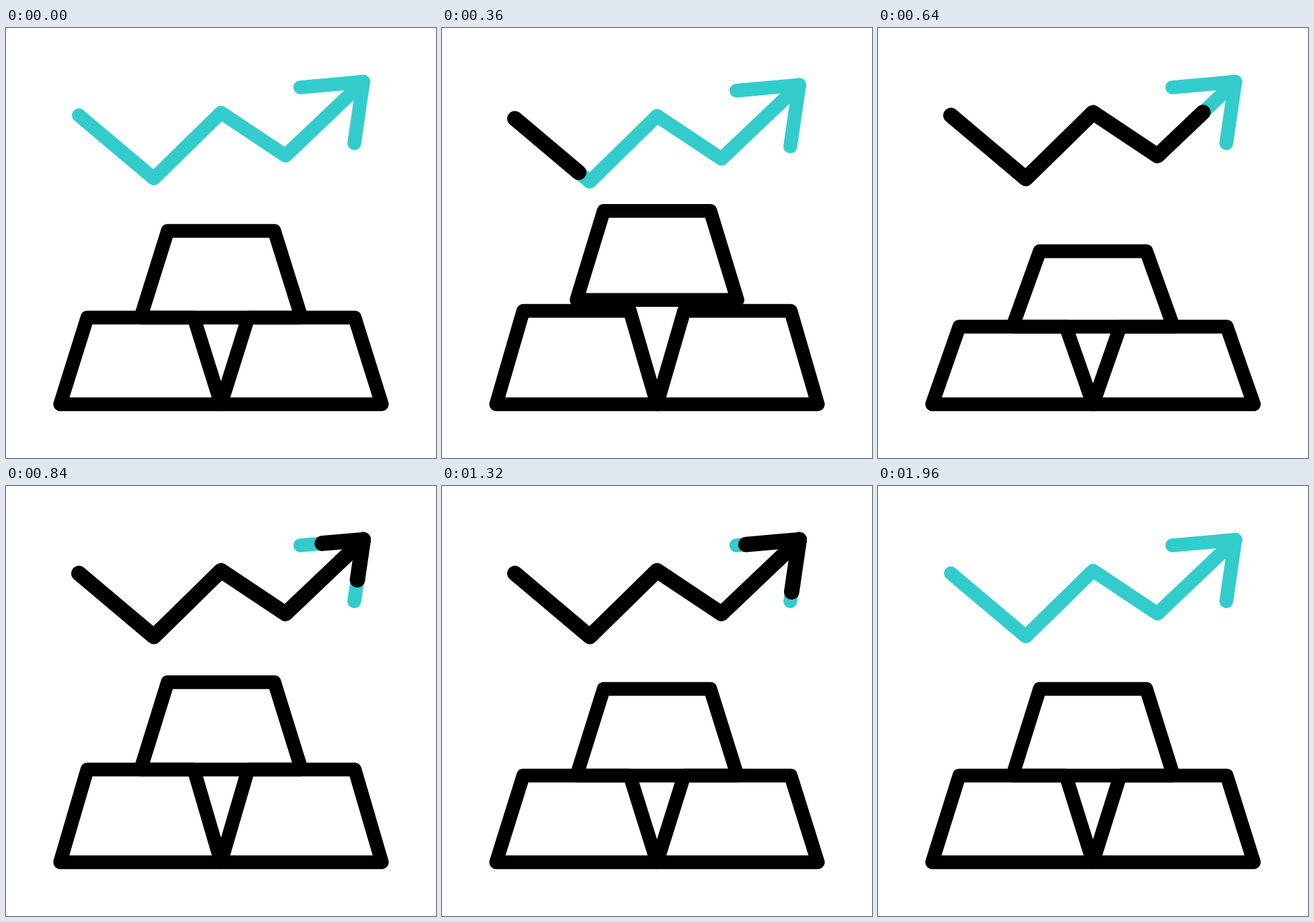
An HTML page for the animation above (2000 ms loop, 640 px wide and 640 px high).

```html
<!DOCTYPE html>
<html lang="en">
<head>
<meta charset="utf-8">
<title>Rising stack</title>
<style>
  html, body { margin: 0; width: 100%; height: 100%; overflow: hidden; background: #fff; }
  svg { display: block; width: 100vw; height: 100vh; }
  path { fill: none; stroke: #000; stroke-width: 20.5; stroke-linecap: round; stroke-linejoin: round; }
  .base path { stroke: #33cccc; }
  .ink path { stroke-width: 22.8; }
</style>
</head>
<body>
<svg viewBox="0 0 640 640">
  <g id="chart">
    <g class="base"></g>
    <g class="ink"></g>
  </g>
  <path id="left"/>
  <path id="right"/>
  <path id="top"/>
</svg>
<script>
const LOOP = 2000, STEP = 40;
const FLOOR = 560, HEIGHT = 129, WIDTH = 239.4, INSET = 40.4;
const $ = s => document.querySelector(s);

const trend = 'M108.4 130L220 224L320 126L416 190L531.7 80';
const barbs = ['M531.7 80L438 88.4', 'M531.7 80L518.4 171.5'];

// Turning points of the bounce: time, squash (+) or stretch (-)
const turns = [[80, 0], [240, 1], [400, -1.07], [640, 1], [830, -0.68], [1000, 0]];

const ramp = (t, from, to) => Math.min(1, Math.max(0, (t - from) / (to - from)));
const smooth = p => p * p * (3 - 2 * p);

// Each turn eases on from the one before it
const bounce = t => turns.slice(1).reduce((sum, [time, value], i) =>
  sum + (value - turns[i][1]) * smooth(ramp(t, turns[i][0], time)), 0);

function addPath(parent, d) {
  const path = document.createElementNS('http://www.w3.org/2000/svg', 'path');
  path.setAttribute('d', d);
  path.setAttribute('pathLength', 1);
  return $(parent).appendChild(path);
}

function reveal(path, part) {
  path.style.visibility = part > 0 ? 'visible' : 'hidden';
  path.style.strokeDasharray = part < 1 ? `${part} 2` : 'none';
}

// A gold bar seen from the front, x is its lower left corner
function bar(id, x, roof, foot) {
  $(id).setAttribute('d',
    `M${x} ${foot}L${x + INSET} ${roof}H${x + WIDTH - INSET}L${x + WIDTH} ${foot}Z`);
}

[trend, ...barbs].forEach(d => addPath('.base', d));
const line = addPath('.ink', trend);
const heads = barbs.map(d => addPath('.ink', d));

function render(t) {
  const squash = bounce(t);
  const hop = 20 * Math.sin(Math.PI * ramp(t, 240, 640));
  const shelf = FLOOR - HEIGHT + 13.5 * squash;
  const foot = shelf - hop;
  const crown = foot - HEIGHT + (squash > 0 ? 16.7 : 1.5) * squash - 0.15 * hop;
  bar('#left', 320 - WIDTH, shelf, FLOOR);
  bar('#right', 320, shelf, FLOOR);
  bar('#top', 320 - WIDTH / 2, crown, foot);

  const lift = 9 * Math.sin(2 * Math.PI * ramp(t, 165, 640));
  $('#chart').setAttribute('transform', `translate(0 ${lift})`);
  reveal(line, ramp(t, 266, 690) - ramp(t, 1479, 1923));
  const headPart = ramp(t, 690, 920) - ramp(t, 1285, 1515);
  heads.forEach(h => reveal(h, headPart));
}

function tick() {
  const t = performance.now() % LOOP;
  render(Math.floor(t / STEP) * STEP);
  requestAnimationFrame(tick);
}
tick();
</script>
</body>
</html>
```
